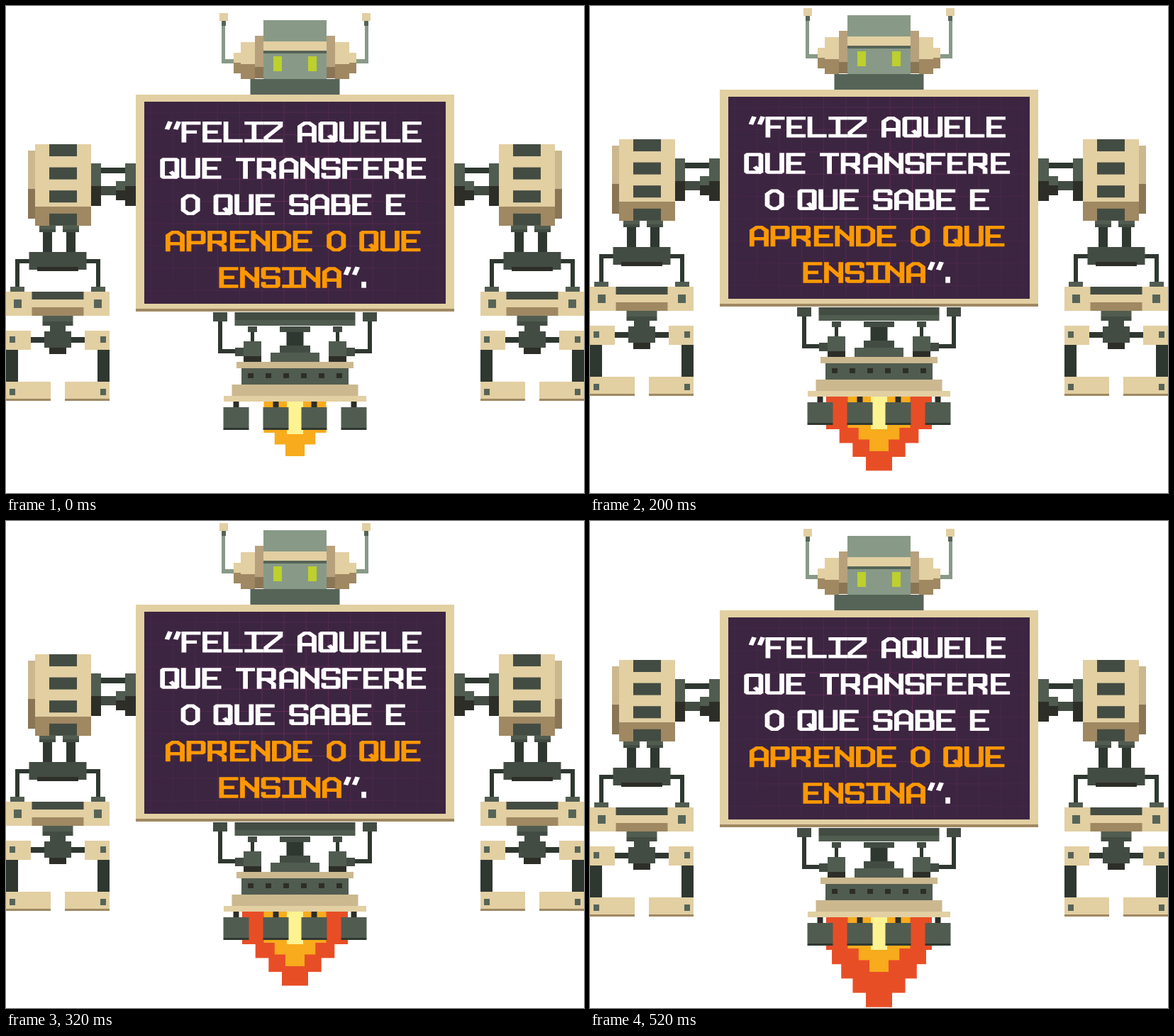
An HTML page that plays this animation: 815 px wide and 687 px high, repeating every 0.6 s.

```html
<!DOCTYPE html>
<html lang="pt">
<head>
<meta charset="utf-8">
<title>Robô</title>
<style>
html, body { margin: 0; width: 100%; height: 100%; overflow: hidden; background: #fff; }
svg { display: block; width: 815px; height: 687px; }
#robot { animation: bob .6s step-end infinite; }
#mid { animation: mid .6s step-end infinite; }
#long { animation: long .6s step-end infinite; }
#words path { fill: none; }
#words text { font: 30px "DejaVu Sans Mono", monospace; fill: transparent; text-anchor: middle; }
@keyframes bob {
  0% { transform: translateY(0); }
  33.333% { transform: translateY(-7px); }
  66.667%, 100% { transform: translateY(1px); }
}
@keyframes mid { 0% { opacity: 0; } 33.333% { opacity: 1; } 66.667%, 100% { opacity: 0; } }
@keyframes long { 0% { opacity: 0; } 66.667%, 100% { opacity: 1; } }
</style>
</head>
<body>
<svg viewBox="0 0 815 687">
  <defs>
    <radialGradient id="glow" gradientUnits="userSpaceOnUse" cx="407" cy="270" r="215">
      <stop offset="0" stop-color="#7a2d63" stop-opacity=".75"/>
      <stop offset=".55" stop-color="#6c2c5c" stop-opacity=".5"/>
      <stop offset="1" stop-color="#5a2c52" stop-opacity=".22"/>
    </radialGradient>
  </defs>
  <g id="robot">
    <g id="mid"></g>
    <g id="long"></g>
    <g id="core"></g>
    <g id="arm"></g>
    <use href="#arm" transform="translate(815) scale(-1 1)"/>
    <g id="body"></g>
    <g id="words"></g>
  </g>
</svg>
<script>
const $ = id => document.getElementById(id);
const add = (id, tag, attrs) => {
  const el = document.createElementNS("http://www.w3.org/2000/svg", tag);
  for (const k in attrs) el.setAttribute(k, attrs[k]);
  return $(id).appendChild(el);
};
const tan = "#e2cfa2", sand = "#cbb88f", clay = "#b7a07c", brown = "#9f8862", umber = "#8a7655";
const sage = "#889a87", moss = "#566458", green = "#515c51", slate = "#434c43", dark = "#2f3830", soot = "#2d2e27";

const box = (id, fill, x, y, width, height) => add(id, "rect", { x, y, width, height, fill });

// Parts that are symmetric about a vertical axis: one centred box, or two at a distance from it.
const around = (id, axis) => ({
  mid: (fill, y, w, h) => box(id, fill, axis - w / 2, y, w, h),
  pair: (fill, gap, y, w, h) => {
    box(id, fill, axis - gap - w, y, w, h);
    box(id, fill, axis + gap, y, w, h);
  }
});

// A flame narrows from its root to its tip in equal drops.
const flame = (id, fill, root, tip, steps, bottom, drop, curve = 1) => {
  const { mid } = around(id, 407.5);
  for (let i = 0; i < steps; i++) {
    const width = root + (tip - root) * (i / (steps - 1 || 1)) ** curve;
    mid(fill, 557, width, bottom + drop * i - 557);
  }
};
flame("mid", "#e84e26", 149, 37, 4, 604, 19.5);
flame("long", "#e84e26", 149, 37, 5, 604, 20.2, 1.4);
flame("core", "#f8ab1c", 88, 27, 3, 602, 16.5);
flame("core", "#fdf390", 23, 23, 1, 604, 0);

function drawArm() {
  const part = (...args) => box("arm", ...args);

  // Shoulder joint
  part(dark, 134, 228, 34, 8);
  part(slate, 134, 254, 34, 13);
  part(green, 155, 247, 13, 13);
  part(soot, 155, 260, 13, 14);
  for (const [x, w] of [[120, 14], [168, 15]]) {
    part(green, x, 222, w, 32);
    part(soot, x, 254, w, 28);
  }

  // Upper arm
  part(sand, 31, 204, 11, 54);
  part(umber, 31, 258, 11, 42);
  const upper = around("arm", 80.5);
  upper.mid(tan, 195, 79, 88);
  upper.mid(brown, 283, 79, 27);
  for (let i = 0; i < 4; i++) upper.mid(slate, 195 + 32.6 * i, 39, 17);

  // Wrist
  const wrist = around("arm", 75);
  wrist.pair(dark, 10, 318, 13, 30);
  wrist.pair(green, 5, 310, 23, 5);
  wrist.pair(slate, 5, 315, 23, 4);

  const hand = around("arm", 73);
  hand.pair(dark, 40, 357, 20, 6);
  hand.pair(dark, 54, 357, 6, 40);
  hand.pair(green, 47, 396, 20, 7);
  hand.mid(slate, 347, 81, 25);
  hand.mid(soot, 368, 58, 6);

  // Palm
  hand.mid(tan, 403, 146, 34);
  hand.mid(slate, 403, 73, 11);
  hand.mid(brown, 425, 73, 12);
  hand.pair(moss, 51, 414, 11, 12);

  // Knuckle and fingers
  hand.mid(green, 437, 43, 8);
  hand.mid(slate, 445, 43, 6);
  hand.mid(dark, 467, 76, 8);
  hand.mid(slate, 451, 22, 32);
  hand.mid(slate, 459, 38, 23);
  hand.mid(soot, 482, 24, 9);
  hand.pair(dark, 56, 485, 17, 45);
  hand.pair(tan, 38, 458, 35, 27);
  hand.pair(tan, 10, 530, 63, 24);
  hand.pair(brown, 10, 554, 63, 3);
  for (const y of [466, 540]) hand.pair(moss, 60, y, 8, 9);
}

function drawBody() {
  const { mid, pair } = around("body", 407.5);

  // Antennas and ears
  pair(sage, 98.5, 21, 5, 59);
  pair(moss, 97.5, 21, 6, 7);
  pair(sage, 85.5, 75, 18, 6);
  pair(tan, 94.5, 10, 12, 11);
  pair(tan, 56.5, 51, 20, 31);
  pair(brown, 56.5, 82, 20, 21);
  pair(tan, 76.5, 66, 10, 14);
  pair(brown, 76.5, 80, 10, 15);
  pair(clay, 44.5, 42, 12, 44);
  pair(umber, 44.5, 86, 12, 16);

  // Head
  mid(sage, 20, 89, 83);
  mid(tan, 50, 89, 13);
  mid(moss, 63, 89, 4);
  mid(moss, 103, 126, 22);
  pair("#bdd02c", 18.5, 71, 12, 21);

  // Board
  mid(tan, 125, 449, 302);
  mid(brown, 427, 449, 4);
  mid("#3c2541", 135, 425, 285);
  let grid = "";
  for (let x = 204.5; x < 620; x += 31.25) grid += `M${x} 135V420`;
  for (let y = 150; y < 420; y += 31.4) grid += `M195 ${y}H620`;
  add("body", "path", { d: grid, stroke: "url(#glow)", fill: "none" });

  // Hips
  pair(dark, 102.5, 445, 6, 45);
  pair(dark, 82.5, 484, 26, 6);
  pair(dark, 57.5, 459, 5, 15);
  pair(slate, 95.5, 432, 20, 13);
  pair(slate, 53.5, 452, 13, 8);
  pair(slate, 72.5, 482, 12, 12);
  pair(green, 47.5, 473, 25, 21);
  pair(soot, 47.5, 494, 25, 8);

  // Waist
  mid(slate, 432, 170, 11);
  mid(green, 443, 170, 8);
  mid(slate, 452, 43, 8);
  mid(dark, 460, 24, 19);
  mid(slate, 479, 43, 10);
  mid(green, 489, 69, 13);

  // Base
  mid(sand, 502, 165, 9);
  mid(green, 511, 151, 23);
  mid(sand, 534, 178, 16);
  mid(tan, 550, 201, 8);
  for (let i = 0; i < 3; i++) pair(soot, 8.5 + 25 * i, 518, 8, 7);

  // Thrusters
  for (const at of [27, 83]) {
    pair(soot, at - 4, 558, 8, 8);
    pair(green, at - 18, 566, 36, 29);
    pair(dark, at - 18, 595, 36, 3);
  }
}

// Letters are single strokes on a grid 4 wide and 6.4 high.
const glyphs = {
  A: "M.5 6.4V1.5L1.5 .5H2.5L3.5 1.5V6.4M.5 4H3.5",
  B: "M.5 0V6.4M0 .5H3.3V3.2H.5M.5 3.2H3.5V5.9H0",
  D: "M.5 0V6.4M0 .5H2.5L3.5 1.5V4.9L2.5 5.9H0",
  E: "M4 .5H.5V5.9H4M.5 3.2H3.2",
  F: "M4 .5H.5V6.4M.5 3.2H3.2",
  I: "M0 .5H4M2 .5V5.9M0 5.9H4",
  L: "M.5 0V5.9H4",
  N: "M.5 0V6.4M3.5 0V6.4M.8 1.3L3.2 4.4",
  O: "M1.5 .5H2.5L3.5 1.5V4.9L2.5 5.9H1.5L.5 4.9V1.5Z",
  P: "M.5 0V6.4M0 .5H3.5V3.7H.5",
  Q: "M.5 .5H3.5V5.9H.5ZM2.2 4.2L3.7 6.2",
  R: "M.5 0V6.4M0 .5H3.5V3.5H.5M2 3.5L3.5 4.9V6.4",
  S: "M3.5 1.8V.5H.5V3.2H3.5V5.9H.5V4.6",
  T: "M0 .5H4M2 .5V6.4",
  U: "M.5 0V5.9H3.5V0",
  Z: "M0 .5H3.5V1.4L.5 4.9V5.9H4",
  "“": "M1.2 0L.5 2.4M3 0L2.3 2.4",
  "”": "M1.2 0L.5 2.4M3 0L2.3 2.4",
  ".": "M.6 4.5V6.4"
};
const advance = { " ": 18, "“": 24, "”": 25, ".": 11, I: 27, O: 28, R: 31.7 };
const advanceOf = ch => advance[ch] || 29.6;

function drawLine(text, row) {
  const chars = [...text], y = 163 + row * 51.3;
  let x = 406 - chars.reduce((sum, ch) => sum + advanceOf(ch), 0) / 2;
  for (const ch of chars) {
    if (glyphs[ch]) add("words", "path", {
      d: glyphs[ch],
      stroke: row > 2 && /[A-Z]/.test(ch) ? "#ff9800" : "#fff",
      "stroke-linejoin": "BPQRSU".includes(ch) ? "bevel" : "miter",
      transform: `translate(${x} ${y}) scale(6.75 4.6)`
    });
    x += advanceOf(ch);
  }
  add("words", "text", { x: 406, y: y + 29 }).textContent = text;
}

drawArm();
drawBody();
["“FELIZ AQUELE", "QUE TRANSFERE", "O QUE SABE E", "APRENDE O QUE", "ENSINA”."].forEach(drawLine);
</script>
</body>
</html>
```
